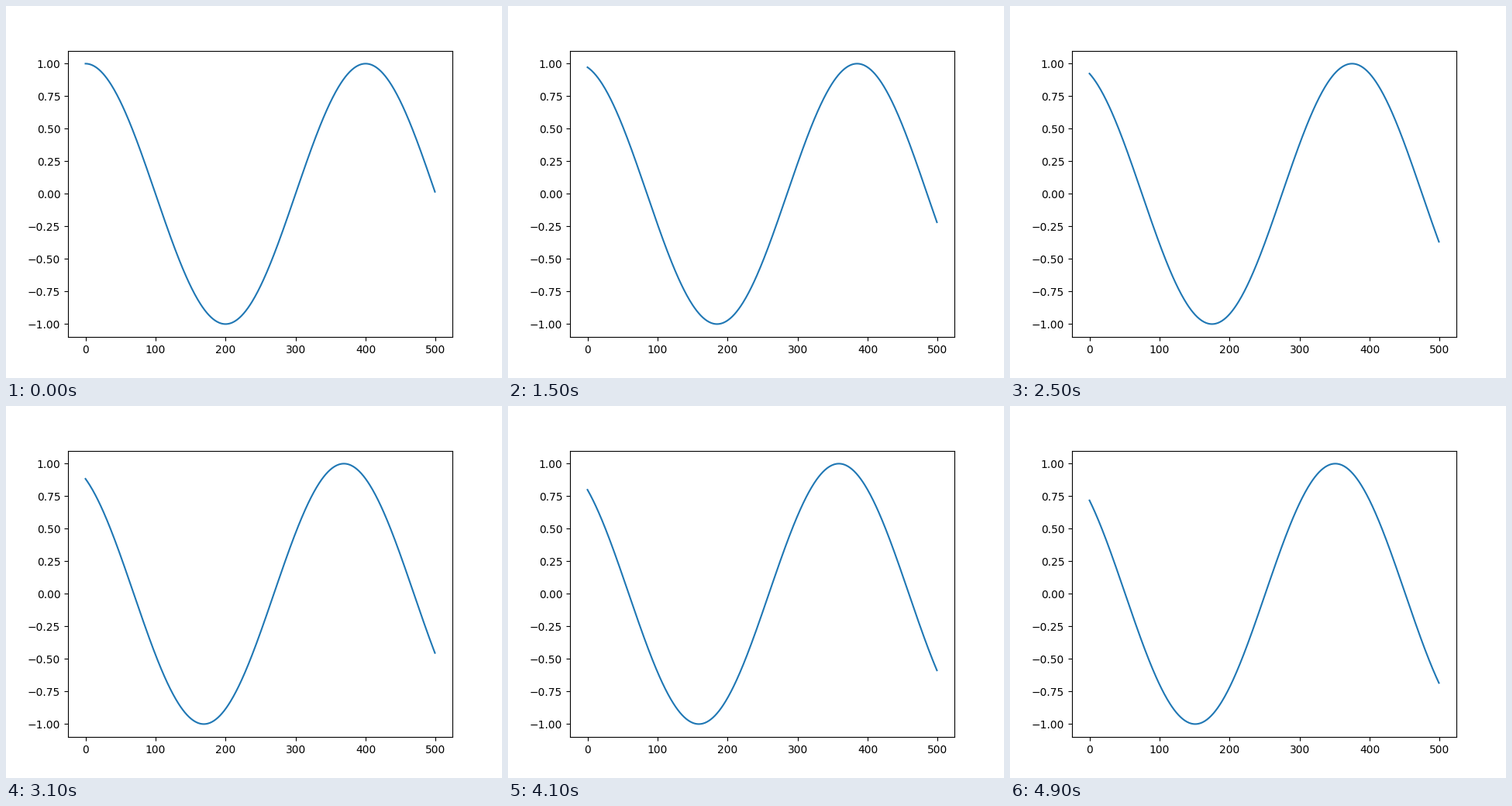
Recreate the animation shown at these times as a matplotlib script. Size 640 px wide and 480 px high, loop 5 s.

```python
import numpy as np
import matplotlib.pyplot as plt
from matplotlib.animation import FuncAnimation

FRAMES = 50
INTERVAL = 100  # ms
PERIOD = 400    # samples per wave

samples = np.arange(500)


def wave(shift):
    return np.cos(2 * np.pi * (samples + shift) / PERIOD)


fig, ax = plt.subplots(figsize=(6.4, 4.8), dpi=100)
line, = ax.plot(samples, wave(0))


def update(frame):
    line.set_ydata(wave(frame))
    return line,


anim = FuncAnimation(fig, update, frames=FRAMES, interval=INTERVAL, repeat=True)
plt.show()
```
